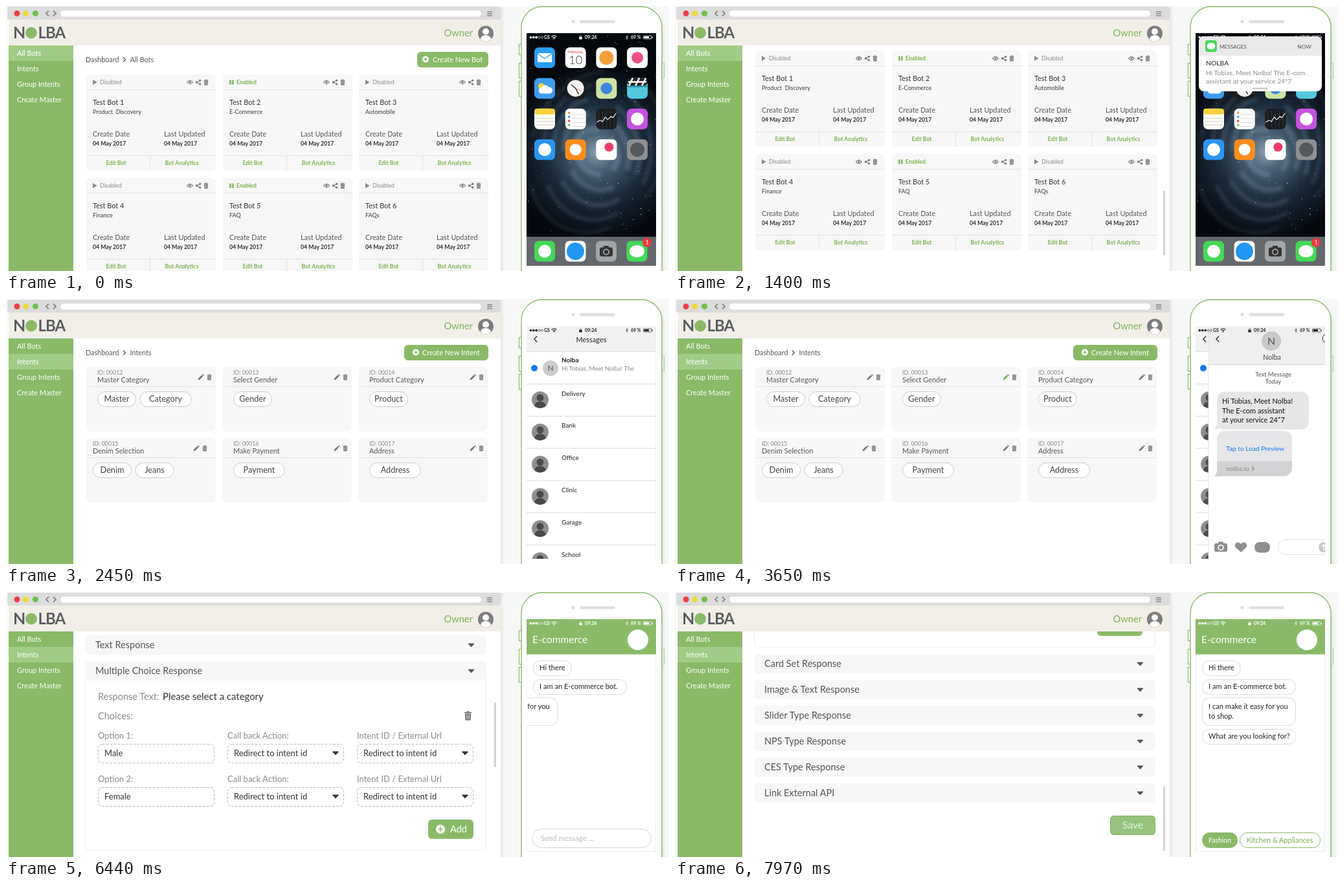
Recreate the animation shown at these times as an HTML page. Size 1024x410 px, loop 8000 ms.

```html
<!DOCTYPE html>
<html lang="en">
<head>
<meta charset="utf-8">
<title>Bot dashboard</title>
<style>
html,body{margin:0;width:100%;height:100%;overflow:hidden;background:#f7f7f7}
svg{display:block;width:100vw;height:100vh;font-family:Lato,Carlito,sans-serif}
text{white-space:pre}
</style>
</head>
<body>
<svg id="stage" viewBox="0 0 1024 410" preserveAspectRatio="none"></svg>
<script>
const LOOP = 8000, GREEN = '#8aba68', TXT = '#555', DARK = '#333', GREY = '#8a8a8a';
const MID = 'text-anchor="middle"', END = 'text-anchor="end"', BOLD = 'font-weight="700"';

// drawing helpers; text is placed by the middle of its capitals
const T = (x, y, s, z = 11, c = TXT, o = '') =>
  `<text x="${x}" y="${(y + z * .35).toFixed(2)}" font-size="${z}" fill="${c}" ${o}>${s}</text>`;
const R = (x, y, w, h, c, r = 0, o = '') =>
  `<rect x="${x}" y="${y}" width="${w}" height="${h}" rx="${r}" fill="${c}" ${o}/>`;
const C = (x, y, r, c, o = '') => `<circle cx="${x}" cy="${y}" r="${r}" fill="${c}" ${o}/>`;
const P = (d, c = 'none', o = '') => `<path d="${d}" fill="${c}" ${o}/>`;
const L = (d, c, w = 1, o = '') => P(d, 'none', `stroke="${c}" stroke-width="${w}" ${o}`);
const G = (x, y, s, o = '') => `<g transform="translate(${x} ${y})" ${o}>${s}</g>`;
const N = (id, s, o = '') => `<g id="${id}" ${o}>${s}</g>`;
const line = c => `stroke="${c}"`;

// small icons
const trash = (x, y, c = '#777', k = 1) => G(x, y,
  `<g transform="scale(${k})">` + R(-3.5, -3.6, 7, 1.3, c, .5) + R(-1.3, -4.6, 2.6, 1.4, c, .5) +
  P('M-3-1.8H3L2.6 4.4H-2.6Z', c) + L('M-1-.6V3.2M1-.6V3.2', '#f7f7f7', .6) + '</g>');
const eye = (x, y) => G(x, y, L('M-4.5 0Q0-5.5 4.5 0Q0 5.5-4.5 0Z', '#777', 1.1) + C(0, 0, 1.7, '#777'));
const share = (x, y) => G(x, y, L('M3-2.8L-2.5 0L3 2.8', '#777', 1.1) +
  C(-2.5, 0, 1.7, '#777') + C(2.7, -2.8, 1.6, '#777') + C(2.7, 2.8, 1.6, '#777'));
const pencil = (x, y, id = '') => G(x, y, `<g id="${id}" fill="#777">` +
  '<path d="M-4.5 4.5L-3.8 1.8L1.4-3.4L3.4-1.4L-1.8 3.8ZM2-4L2.9-4.8Q3.4-5 4.6-3.7Q5-3.2 4.8-2.8L4-2Z"/></g>');
const plus = (x, y, r) => C(x, y, r, '#fff') + L(`M${x - r * .55} ${y}h${r * 1.1}M${x} ${y - r * .55}v${r * 1.1}`, GREEN, 1.6);
const caret = (x, y, c = TXT) => P(`M${x - 4.5} ${y - 2}h9l-4.5 5z`, c, `stroke="${c}" stroke-linejoin="round"`);
const chevron = (x, y, h, c, w = 1.4) => L(`M${x + h / 2} ${y - h}l${-h} ${h}l${h} ${h}`, c, w);
const crumb = name => T(123, 83, 'Dashboard', 10.8) + L('M181 79.5l3.5 3.5l-3.5 3.5', TXT, 1.3) + T(191.5, 83, name, 10.8);
const bigButton = (x, w, s) => R(x, 71, w, 24, GREEN, 6) + plus(x + 14 - (w > 120 ? -4 : 1), 82.5, 5) + T(x + (w > 120 ? 28 : 24), 83, s, 11, '#fff');
const person = (x, y, r, bg, fg) => C(x, y, r, bg) + C(x, y - r * .25, r * .42, fg) +
  P(`M${x - r * .7} ${y + r * .7}Q${x - r * .55} ${y + r * .2} ${x} ${y + r * .2}T${x + r * .7} ${y + r * .7}Q${x} ${y + r * 1.28} ${x - r * .7} ${y + r * .7}`, fg);

// browser pages
function botCard(i, [name, kind]) {
  const on = i % 3 === 1;
  return G([124, 335, 545][i % 3], 106 + 160 * (i / 3 | 0),
    R(0, 0, 200, 149, '#f7f7f7', 6) +
    (on ? R(10, 8.5, 2.8, 7, GREEN) + R(14, 8.5, 2.8, 7, GREEN) + T(21, 12, 'Enabled', 8.7, '#76b04e', BOLD)
        : P('M10 8v8l6.5-4z', GREY) + T(21, 12, 'Disabled', 8.9, GREY)) +
    eye(160, 12) + share(173, 12) + trash(185, 12) +
    L('M0 23.5H200M0 125.5H200M98.5 126V149', '#e2e2e2') +
    T(10, 43, name, 10.9, DARK) + T(10, 58, kind, 9, '#3c3c3c') +
    T(10, 92, 'Create Date', 10.8) + T(120, 92, 'Last Updated', 10.9) +
    T(10, 107, '04 May 2017', 8.7, DARK, BOLD) + T(120, 107, '04 May 2017', 8.7, DARK, BOLD) +
    T(46, 137, 'Edit Bot', 8.7, '#7db157', MID + BOLD) + T(147.5, 137, 'Bot Analytics', 8.8, '#7db157', MID + BOLD));
}
const kinds = ['Product  Discovery', 'E-Commerce', 'Automobile', 'Finance', 'FAQ', 'FAQs'];
const botsPage = crumb('All Bots') + bigButton(635, 110, 'Create New Bot') +
  kinds.map((k, i) => botCard(i, ['Test Bot ' + (i + 1), k])).join('');

function intentCard(i, [name, ...chips]) {
  const x = 124 + 210 * (i % 3), y = 105 + 110 * (i / 3 | 0), dx = i === 3 ? 10 : 17, e = i === 3 ? 170 : 177;
  let cx = dx;
  const pills = chips.map(([s, w]) => {
    const p = R(cx + .5, 38.5, w - 1, 23, '#fff', 11.5, line('#ccc')) + T(cx + w / 2, 50, s, 12.7, '#444', MID);
    cx += w + 5.5;
    return p;
  }).join('');
  return G(x, y, R(0, 0, 200, 100, '#f7f7f7', 6) + L('M0 30.5H200', '#e2e2e2') +
    T(dx, 9, 'ID: 000' + (12 + i), 8.9, GREY) + T(dx, 20.5, name, 11) +
    pencil(e, 16, 'pen' + i) + trash(e + 13, 16) + pills);
}
const intents = [
  ['Master Category', ['Master', 60], ['Category', 80]], ['Select Gender', ['Gender', 60]], ['Product Category', ['Product', 60]],
  ['Denim Selection', ['Denim', 60], ['Jeans', 60]], ['Make Payment', ['Payment', 80]], ['Address', ['Address', 80]]];
const intentsPage = crumb('Intents') + bigButton(615, 130, 'Create New Intent') + intents.map((c, i) => intentCard(i, c)).join('');

const row = (s, i) => R(122, 207 + 40 * i, 620, 30, '#f7f7f7', 6) + T(138, 221.5 + 40 * i, s, 14.5) + caret(718.5, 222 + 40 * i);
const field = (x, y, label, s, pick) => T(x, y - 12.5, label, 13, GREY) +
  R(x + .5, y + .5, 179, 29, '#fff', 6, line('#bbb') + ' stroke-dasharray="4 2"') + T(x + 10, y + 14, s, 13, DARK) +
  (pick ? caret(x + 167, y + 14, DARK) : '');
const option = (n, s, y) => field(142, y, `Option ${n}:`, s) +
  field(342, y, 'Call back Action:', 'Redirect to intent id', 1) + field(542, y, 'Intent ID / External Url', 'Redirect to intent id', 1);
const rows = ['Text', 'Multiple Choice', 'Card Set', 'Image &amp; Text', 'Slider Type', 'NPS Type', 'CES Type']
  .map(s => s + ' Response').concat('Link External API').map(row);
const panel = R(122.5, 268, 619, 271.5, '#fff', 6, line('#ececec')) +
  T(142, 302, 'Response Text:', 14.5, GREY) + T(242, 302, 'Please select a category', 14.9, DARK) +
  T(142, 332, 'Choices:', 14.5, GREY) + trash(713.5, 331.5, '#777', 1.6) +
  option(1, 'Male', 375) + option(2, 'Female', 442) +
  N('add', R(652, 492, 70, 30, GREEN, 6) + plus(671, 507, 7) + T(686, 507, 'Add', 14.5, '#fff'));
const editPage = crumb('Edit Intents Response') + R(122, 97, 620, 100, '#f7f7f7', 6) +
  T(137, 121, 'Select Gender', 16.6) + R(137.5, 147.5, 79, 29, '#fff', 14.5, line(GREEN)) + T(177, 161, 'Gender', 14.6, TXT, MID) +
  N('panel', panel, 'clip-path="url(#panelClip)"') + rows.slice(0, 2).join('') +
  N('below', rows.slice(2).join('') + R(672.5, 537.5, 69, 29, GREEN, 5, 'id="save"') + T(707, 552, 'Save', 15.5, '#fff', MID + 'id="saveText"'));

const browser = R(2, 0, 762, 410, '#fff') + R(2, 1, 762, 20, '#dcdcdc', 2) +
  C(17, 11.5, 4.5, '#ee3e46') + C(30.5, 11.5, 4.5, '#e9dc3c') + C(45.5, 11.5, 4.5, '#70bf50') +
  chevron(64, 11.5, 4, '#777', 1.6) + L('M73 7.5l4 4l-4 4', '#777', 1.6) + R(84, 7, 650, 9.5, '#fff', 4.7) +
  L('M743 9h8M743 12h8M743 15h8', '#888', 1.4) +
  R(4, 21, 760, 40, '#f1eee8') + R(4, 61, 100, 349, GREEN) + R(4, 61, 100, 24, '#a1cb86', 0, 'id="mark"') +
  ['All Bots', 'Intents', 'Group Intents', 'Create Master'].map((s, i) => T(17, 73 + 24 * i, s, 11, '#fff')).join('') +
  T(11, 41.5, 'N', 25, '#5c5e60', BOLD) + C(39, 41.5, 9, GREEN) + T(49.5, 41.5, 'LBA', 24, '#5c5e60', BOLD + 'letter-spacing="-1"') +
  T(721, 42, 'Owner', 14.7, '#80b45c', END) + person(741, 42.5, 12, '#7d7d7d', '#fff') +
  `<g clip-path="url(#pageClip)">` + N('bots', botsPage) + N('intents', intentsPage) + N('edit', editPage) +
  R(754, 71, 3, 100, '#d2d2d2', 1.5, 'id="thumb"') + '</g>' +
  R(764, 2, 6, 408, 'url(#shade)');

// phone screens
const status = c => [0, 1, 2, 3, 4].map(i => C(810.3 + 4.4 * i, 48.5, 1.6, i < 3 ? c : 'none', `stroke="${c}" stroke-width=".6"`)).join('') +
  T(831, 48.5, 'GS', 7, c, BOLD) +
  L('M842.5 47.5q4-3.5 8 0M844.3 49.3q2.2-2 4.4 0', c, 1.1) + C(846.5, 50.7, .9, c) +
  R(885.3, 48, 4.4, 3.6, c, .5) + L('M886.2 48v-1.2q1.3-1.8 2.6 0v1.2', c, .8) + T(894, 48.5, '09:24', 7.2, c, BOLD) +
  L('M957.5 47l3 3l-1.5 1.5v-6l1.5 1.5l-3 3', c, .6) + T(965, 48.5, '69 %', 7, c, BOLD) +
  R(984.5, 46, 12.5, 5, 'none', 1, `stroke="${c}" stroke-width=".7"`) + R(985.5, 47, 7.5, 3, c) + R(997.8, 47.5, 1.2, 2, c);

let seed = 7;
const rnd = () => (seed = seed * 16807 % 2147483647) / 2147483647;
const stars = Array.from({length: 170}, () =>
  C((804 + rnd() * 200).toFixed(1), (42 + rnd() * 315).toFixed(1), (.25 + rnd() * .5).toFixed(2), '#dfe8f2', `opacity="${(.3 + rnd() * .6).toFixed(2)}"`)).join('');
const arms = [30, 48, 66, 84, 102].map((r, i) =>
  `<ellipse cx="912" cy="226" rx="${r}" ry="${r * 1.25}" fill="none" stroke="#8aa6bd" stroke-width="${9 - i}" opacity="${.3 - i * .045}"
    stroke-dasharray="${r * 1.6} ${r * .7}" stroke-dashoffset="${i * 31}" transform="rotate(${-35 + i * 14} 912 226)" filter="url(#soft)"/>`).join('');
const wallpaper = R(804, 42, 200, 360, '#04060a') + R(804, 42, 200, 360, 'url(#galaxy)') + arms + stars;

const dots = (c, x = 16, y = 16, r = 9) => C(x, y, r, c);
const apps = [
  ['#2a9df4', P('M5 9h22v14H5z', '#fff') + L('M5 9.5l11 8l11-8', '#2a9df4', 1.3)],
  ['#fff', T(16, 7, 'Monday', 6.5, '#e33', MID) + T(16, 20, '10', 18, '#222', MID + 'font-weight="300"')],
  ['#fff', dots('#f2a03a', 16, 16, 11)],
  ['#fff', dots('#ee4f86')],
  ['#3f9df0', C(11, 13, 5, '#ffd43a') + P('M10 24a4.5 4.5 0 0 1 1-8.8a6 6 0 0 1 11-1a5 5 0 0 1 2 9.8z', '#fff')],
  ['#1c1c1e', C(16, 16, 13, '#f4f4f4') + L('M16 16L9 10M16 16L21 25', '#222', 1.3) + L('M16 16L24 20', '#e66', .7)],
  ['#cfe3a6', dots('#3d86e0')],
  ['#52c9dd', R(0, 0, 32, 12, '#222', 6) + L('M3 12L9 0M13 12L19 0M23 12L29 0M2 6H30', '#fff', 2.5) + L('M0 13H32', '#2b8ea0', 2)],
  ['#fdfdf6', R(0, 0, 32, 9, '#fad23d', 4) + L('M2 15H30M2 20H30M2 25H30', '#ccc', .9)],
  ['#fff', ['#f4943c', '#3f9bf0', '#e5513f', '#6cc04a'].map((c, i) => C(6, 6.5 + 6.3 * i, 1.8, c) + L(`M10 ${8.8 + 6.3 * i}H30`, '#ccc', .8)).join('')],
  ['#1a1d20', L('M4 3V29M10 3V29M16 3V29M22 3V29M28 3V29', '#3a3f44', .8) + L('M1 21l5-3l4 2l4-7l4 4l5-5l3 2l5-7', '#fff', 1.1)],
  ['#c553e0', dots('#fff', 16, 16, 10)],
  ['#2c95f3', dots('#fff', 16, 16, 10)],
  ['#fb8d1c', dots('#fff')],
  ['#fff', dots('#f03c6c', 20, 12, 7)],
  ['#8d8f93', dots('#55585c', 16, 16, 11)]];
const tile = (x, y, [c, s]) => G(x, y, R(0, 0, 32, 32, c, 7) + s);
const msgTile = ['#45d858', '<ellipse cx="16" cy="16" rx="11.5" ry="9.5" fill="#fff"/>'];
const banner = R(809, 47, 190, 85, '#fff', 8) + P('M809 77V55a8 8 0 0 1 8-8H991a8 8 0 0 1 8 8V77Z', '#e9e9e9') +
  G(819, 53, `<g transform="scale(.56)">${tile(0, 0, msgTile)}</g>`) +
  T(841, 63, 'MESSAGES', 8.2, '#555') + T(983, 63, 'NOW', 8.4, '#555', END) +
  T(820, 88.5, 'NOLBA', 10.4, '#222') + T(820, 103, 'Hi Tobias, Meet Nolba! The E-com', 10.3, GREY) +
  T(820, 116.5, 'assistant at your service 24*7', 10.3, GREY) + R(892, 126.5, 24, 2, '#c4c4c4', 1);
const home = wallpaper + status('#fff') +
  apps.map((a, i) => tile(816 + 47.7 * (i % 4), 64 + 47.4 * (i / 4 | 0), a)).join('') +
  R(804, 357, 200, 45, '#6c7075', 0, 'opacity=".92"') +
  tile(816, 363.5, ['#45d858', dots('#fff', 16, 16, 10)]) + tile(863.5, 363.5, ['#fff', dots('#2196f3', 16, 16, 13.5)]) +
  tile(911, 363.5, ['#a2a4a8', R(6, 10, 20, 14, '#333', 3) + R(12, 7.5, 8, 4, '#333', 1) + C(16, 17, 5, '#a2a4a8') + C(16, 17, 3.3, '#333')]) +
  N('msg', tile(958.5, 363.5, msgTile)) + C(990, 366, 7, '#f0373c') + T(990, 366, '1', 9, '#fff', MID) + N('banner', banner);

const labels = ['Delivery', 'Bank', 'Office', 'Clinic', 'Garage', 'School'];
const list = R(804, 42, 200, 360, '#fff') + R(804, 42, 200, 40, '#f2f2f2') + L('M804 81.5H1004', '#ddd') +
  chevron(818, 62, 4.5, DARK) + T(904, 63, 'Messages', 11, '#222', MID) +
  C(816, 107, 5, '#1779f2') + C(841, 107, 12, '#ccc') + T(841, 107, 'N', 12, '#555', MID) +
  T(858, 94, 'Nolba', 10, '#222', BOLD + 'id="sender"') + T(858, 108, 'Hi Tobias, Meet Nolba! The', 9.5, GREY) +
  labels.map((s, i) => L(`M804 ${131.5 + 49.8 * i}H1004`, '#ddd') + person(825, 156 + 49.8 * i, 13, '#8e8e8e', '#4a4a4a') +
    T(858, 146 + 49.8 * i, s, 10, '#222')).join('');

const tail = y => P(`M817 ${y - 14}q1 11-5 13q7 2 12-4z`, '#e6e6e8');
const chat = R(804, 42, 200, 360, '#fff') + R(804, 42, 200, 59, '#efefef') + L('M804 101.5H1004', '#d4d4d4') + L('M804 42V402', '#e4e4e4') +
  chevron(818, 62, 4.5, DARK) + C(901, 65, 15, '#c9c9cb') + T(901, 65, 'N', 16, '#555', MID) + T(902, 90, 'Nolba', 10.6, '#444', MID) +
  C(987, 61, 7, 'none', line(DARK)) + T(987, 61, 'i', 9, DARK, MID) +
  T(904, 117, 'Text Message', 9.4, TXT, MID) + T(904, 128, 'Today', 9.4, TXT, MID) +
  tail(202) + R(817, 143.5, 142, 58.5, '#e6e6e8', 12) +
  ['Hi Tobias, Meet Nolba!', 'The E-com assistant', 'at your service 24*7'].map((s, i) => T(825, 158.5 + 14.3 * i, s, 11, '#111')).join('') +
  P('M817 251H933V262a12 12 0 0 1-12 12H829q-8 1-17 0q5-3 5-8Z', '#d2d2d4') + P('M817 251V216a12 12 0 0 1 12-12H921a12 12 0 0 1 12 12V251Z', '#e6e6e8') +
  T(831, 231.5, 'Tap to Load Preview', 10.2, '#1779f2', 'id="tap"') + T(831, 262, 'nolba.io', 10.4, GREY) + L('M871 259.5l3 3l-3 3', GREY, 1.2) +
  R(813, 378, 20, 13, '#8e8e8e', 2.5) + R(819, 375.5, 8, 4, '#8e8e8e', 1) + C(823, 384.5, 4.6, '#fff') + C(823, 384.5, 3, '#8e8e8e') +
  P('M854 392l-8-7.5a4.6 4.6 0 0 1 7-6.5l1 1l1-1a4.6 4.6 0 0 1 7 6.5z', '#8e8e8e') + R(875, 376, 24, 16.5, '#8e8e8e', 8) +
  R(911.5, 372.5, 86, 23, '#fff', 11.5, line('#ddd')) + C(982, 384, 8, '#c9c9cb') + L('M982 388v-8m-3 3l3-3l3 3', '#fff', 1.3);

const bubble = (id, y, w, h, ...lines) => N(id, R(814.5, y + .5, w - 1, h - 1, '#fff', Math.min(h / 2, 11), line('#ddd')) +
  lines.map((s, i) => T(824, y + (lines.length > 1 ? 14.5 : h / 2 - .5) + 14.3 * i, s, 11.1, '#222')).join(''));
const shop = R(804, 42, 200, 360, '#fff') + R(804.5, 42, 199, 359.5, 'none', 0, line('#eee')) + R(804, 42, 200, 54.5, GREEN) + status('#fff') +
  T(813, 74, 'E-commerce', 15.5, '#fff') + C(976, 74, 16, '#fff') +
  bubble('b0', 106, 60, 24, 'Hi there') + bubble('b1', 135, 145, 24, 'I am an E-commerce bot.') +
  bubble('b2', 163, 145, 44, 'I can make it easy for you', 'to shop.') + bubble('b3', 212, 145, 24, 'What are you looking for?') +
  N('input', R(812.5, 366.5, 184, 29, '#fff', 14.5, line('#d6d6d6')) + T(825.5, 380.5, 'Send message ...', 11.5, '#bbb')) +
  N('choices', R(814, 372, 55, 24, GREEN, 12) + T(841.5, 384, 'Fashion', 10.5, '#fff', MID) +
    R(872.5, 372.5, 124, 23, '#fff', 11.5, line(GREEN)) + T(934, 384, 'Kitchen &amp; Appliances', 11, '#76aa52', MID));

const key = (x, y, h) => R(x, y + .5, 4, h, '#fff', 0, `stroke="${GREEN}" stroke-width="1.2"`);
const phone = key(792.5, 59, 16) + key(792.5, 88, 23) + key(792.5, 116, 23) + key(1012.5, 88, 23) +
  R(800, 6, 216, 460, '#e2e2e2', 32, 'filter="url(#soft)"') +
  R(796, 1, 217, 460, '#fff', 32, `stroke="${GREEN}" stroke-width="1.4"`) +
  C(876, 24, 2.6, '#dedede') + R(886, 22, 55, 4.5, '#dedede', 2.2) +
  `<g clip-path="url(#screenClip)">` + N('home', home) + N('list', list + N('chat', chat) + status('#222')) + N('shop', shop) + '</g>';

const stage = document.getElementById('stage');
stage.innerHTML = `<defs>
  <clipPath id="pageClip">${R(104, 61, 660, 349, '#000')}</clipPath>
  <clipPath id="screenClip">${R(804, 42, 200, 360, '#000')}</clipPath>
  <clipPath id="panelClip">${R(100, 262, 660, 0, '#000', 0, 'id="panelWin"')}</clipPath>
  <linearGradient id="shade"><stop stop-color="#e6e6e6"/><stop offset="1" stop-color="#f7f7f7"/></linearGradient>
  <radialGradient id="galaxy" gradientUnits="userSpaceOnUse" cx="912" cy="226" r="135">
    <stop stop-color="#8b9fb0"/><stop offset=".2" stop-color="#4d6376"/><stop offset=".55" stop-color="#1c2b3a"/><stop offset="1" stop-color="#05080d"/></radialGradient>
  <filter id="soft"><feGaussianBlur stdDeviation="2.5"/></filter></defs>` + R(0, 0, 1024, 410, '#f7f7f7') + browser + phone;

const el = {};
stage.querySelectorAll('[id]').forEach(e => el[e.id] = e);
const set = (id, k, v) => el[id].setAttribute(k, v);
const move = (id, x, y) => set(id, 'transform', `translate(${x} ${y})`);
const fade = (id, o) => { set(id, 'opacity', o); set(id, 'visibility', o > 0 ? 'visible' : 'hidden'); };
const inOut = p => p < .5 ? 2 * p * p : 1 - 2 * (1 - p) ** 2;
const out = p => 1 - (1 - p) ** 3;

function draw(t) {
  const lin = (a, b) => Math.min(1, Math.max(0, (t - a) / (b - a)));
  const ease = (a, b) => inOut(lin(a, b));
  const pulse = (a, b) => Math.sin(Math.PI * lin(a, b));

  // browser
  const peek = ease(470, 900) - ease(1390, 1820);
  const botsOn = 1 - lin(1850, 2180);
  const down1 = ease(5700, 6140), down2 = ease(7460, 7970), open = ease(5210, 5550);
  move('bots', 0, -37 * peek);
  fade('bots', botsOn);
  fade('intents', lin(2120, 2450) - lin(3960, 4200));
  fade('edit', lin(4230, 4490));
  move('edit', 0, -140 * down1 - 314 * down2);
  move('below', 0, 263 * open);
  set('panelWin', 'height', open ? 15 + 263.5 * open : 0);
  set('mark', 'y', 61 + 24 * lin(1870, 2300));
  set('pen1', 'fill', t > 3500 ? '#6fae45' : '#777');
  set('add', 'opacity', 1 - .4 * pulse(6650, 6980));
  const pressed = t >= 7950;
  set('save', 'fill', pressed ? '#98c47f' : GREEN);
  set('save', 'stroke', pressed ? '#7fb05f' : GREEN);
  set('saveText', 'fill', pressed ? '#e4f0dc' : '#fff');
  const first = t < 4000;
  set('thumb', 'y', first ? 71 + 215 * peek : 71 + 100 * down1 + 130 * down2);
  fade('thumb', first ? (t >= 300 ? botsOn : 0) : +(t >= 5700));

  // phone
  move('banner', 0, -92 * (1 - ease(470, 900)));
  const grow = 1 + .21 * (ease(1760, 1900) - ease(1920, 2050));
  const zoom = (id, k) => set(id, 'transform', `translate(974.5 379.5) scale(${k}) translate(-974.5 -379.5)`);
  zoom('msg', grow);
  const app = ease(2050, 2450);
  zoom('list', .15 + .85 * app);
  fade('list', Math.min(1, app * 3));
  set('sender', 'fill', t < 2935 ? '#222' : '#000');
  move('chat', 200 * (1 - out(lin(3410, 3860))), 0);
  set('tap', 'opacity', 1 - .6 * pulse(4230, 4510));
  fade('shop', lin(4730, 4880));
  [[5180, 70], [5710, 155], [6320, 155], [6720, 155]].forEach(([a, w], i) => move('b' + i, -w * (1 - lin(a, a + 390)), 0));
  move('input', 0, 40 * ease(6870, 7060));
  move('choices', 0, 36 * (1 - ease(7040, 7320)));
}

const start = performance.now();
function tick() {
  draw((performance.now() - start) % LOOP);
  requestAnimationFrame(tick);
}
tick();
</script>
</body>
</html>
```
